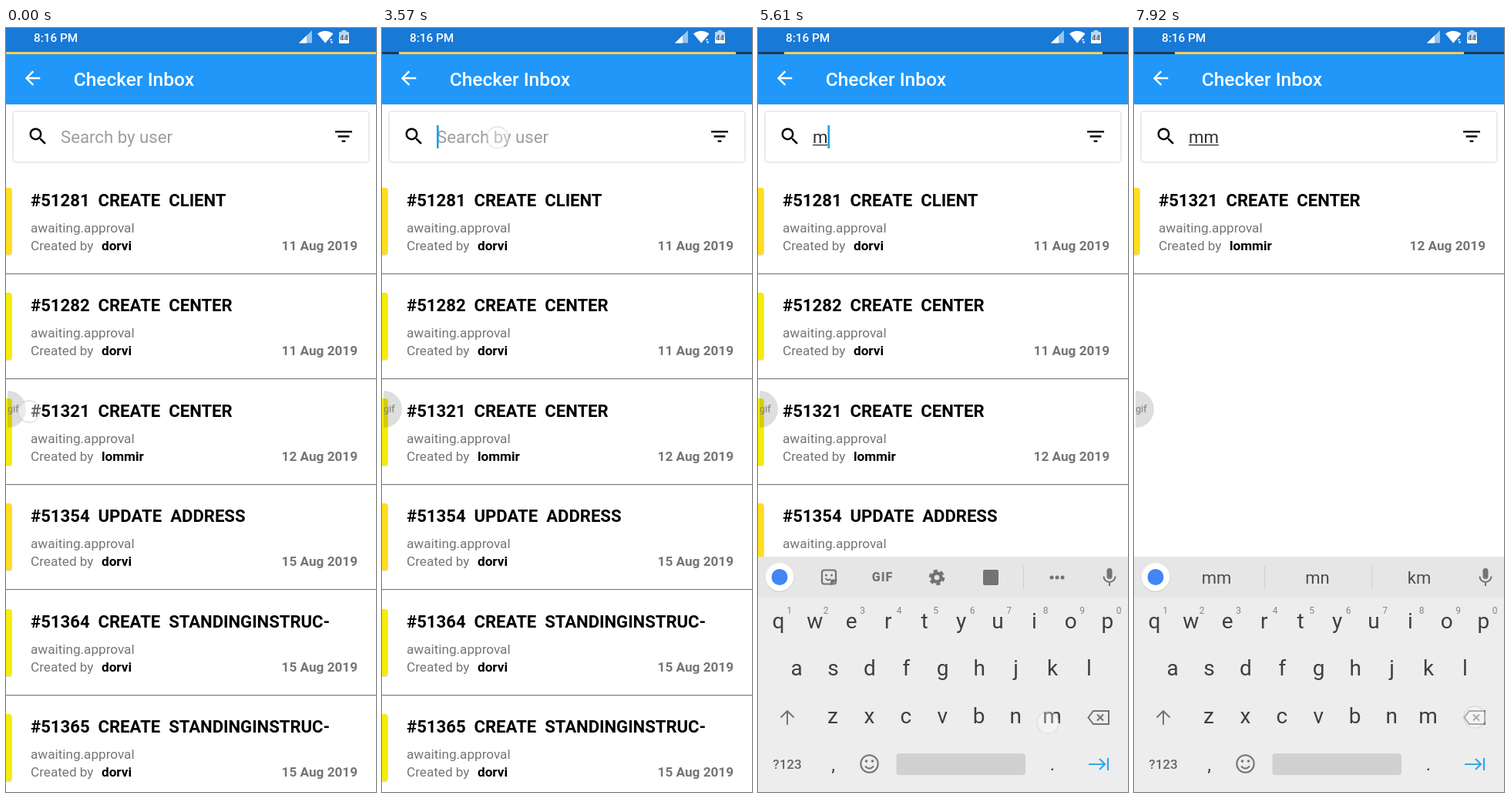
These frames come from a looping animation (480 px wide and 990 px high, 8000 ms). An HTML page:

```html
<!DOCTYPE html>
<html lang="en">
<head>
<meta charset="utf-8">
<title>Checker Inbox</title>
<style>
html, body { margin: 0; width: 100%; height: 100%; overflow: hidden; background: #fff; }
svg { display: block; width: 480px; height: 990px; font-family: Roboto, sans-serif; }
text { white-space: pre; }
</style>
</head>
<body>
<svg id="stage" viewBox="0 0 480 990"></svg>
<script>
const LOOP = 8000;
const GREY = '#757575';
const GOLD = '#ffdd1e', LEMON = '#f6ec08';

const rows = [
  ['#51281', 'CREATE  CLIENT', 'dorvi', '11 Aug 2019'],
  ['#51282', 'CREATE  CENTER', 'dorvi', '11 Aug 2019'],
  ['#51321', 'CREATE  CENTER', 'lommir', '12 Aug 2019'],
  ['#51354', 'UPDATE  ADDRESS', 'dorvi', '15 Aug 2019'],
  ['#51364', 'CREATE  STANDINGINSTRUC-', 'dorvi', '15 Aug 2019'],
  ['#51365', 'CREATE  STANDINGINSTRUC-', 'dorvi', '15 Aug 2019']
];
const MATCH = 2;
const rowY = i => Math.round(i * 136.4);

// time, left edge of the timer bar
const barSteps = [[0, 0], [420, 5], [720, 7], [1020, 10], [1290, 12], [2580, 17], [2870, 19],
  [3170, 22], [4230, 26], [4530, 29], [4830, 31], [5060, 34], [6040, 38], [6340, 41],
  [6690, 43], [6990, 46], [7290, 48], [7580, 50], [7830, 53]];

// x, y, down, release, gone
const touches = [
  [30, 497, -1, 90, 420],
  [126, 117, 1380, 2080, 2250],
  [150, 142, 3340, 3560, 3700],
  [376, 900, 5400, 5570, 5700],
  [377, 895, 6150, 6380, 6560],
  [442, 893, 7830, 8000, 8001]
];

// cursor is visible inside these spans
const cursorOn = [[3560, 4060], [4560, 5060], [5570, 6070], [6340, 6840], [7330, 7830]];

const text = (x, y, size, fill, str, extra = '') =>
  `<text x="${x}" y="${y}" font-size="${size}" fill="${fill}" ${extra}>${str}</text>`;
const rect = (x, y, w, h, fill, extra = '') =>
  `<rect x="${x}" y="${y}" width="${w}" height="${h}" fill="${fill}" ${extra}/>`;
const circle = (x, y, r, fill, extra = '') =>
  `<circle cx="${x}" cy="${y}" r="${r}" fill="${fill}" ${extra}/>`;
const path = (d, fill, extra = '') => `<path d="${d}" fill="${fill}" ${extra}/>`;
const line = (d, stroke, w) => path(d, 'none', `stroke="${stroke}" stroke-width="${w}"`);
// 24-unit icon centred on x, y
const icon = (x, y, d, fill) =>
  `<g transform="translate(${x} ${y}) scale(1.222) translate(-12 -12)">${path(d, fill)}</g>`;
const MID = 'text-anchor="middle"', BOLD = 'font-weight="700"', MEDIUM = 'font-weight="500"';

function rowMarkup([id, action, user, date], i) {
  const fill = i === 0 || i === 3 ? GOLD : LEMON;
  return `<g class="row" transform="translate(0 ${rowY(i)})">
    ${rect(-8, 208, 15.8, 87, '#dedede', 'rx="3.500"')}
    ${rect(-8, 207, 15.6, 86.5, fill, 'rx="3.500" class="tag"')}
    ${text(32, 231, 22.1, '#000', id + '  ' + action, BOLD)}
    ${text(32, 265, 17.15, GREY, 'awaiting.approval')}
    ${text(32, 288.3, 17.15, GREY, 'Created by')}
    ${text(124, 288.3, 17.15, '#000', user, BOLD)}
    ${text(456, 288.3, 17.15, GREY, date, BOLD + ' text-anchor="end"')}
    ${rect(0, 318, 480, 1.1, '#80707f')}
  </g>`;
}

function header() {
  return rect(0, 0, 480, 31, '#1979d6') + rect(0, 34, 480, 65, '#2097f9')
    + text(36, 17.5, 15.3, '#fff', '8:16 PM', MEDIUM)
    + path('M380 19.5L397 3v16.5z', '#8fc4f3') + path('M380 19.5L390 9.8v9.7z', '#fff')
    + path('M404 7.5q10-7.5 20.500 0L414.200 19.500z', '#fff')
    + path('M419 15h5v5h-5z', '#1979d6') + path('M419.500 16l2-2 2 2zM420.500 17.500h4l-2 2.500z', '#fff')
    + path('M432 6q0-1 1-1h2.500v-2h6v2h2.500q1 0 1 1v13q0 1-1 1h-11q-1 0-1-1z', '#b9d8f5')
    + path('M432 13h13v6q0 1-1 1h-11q-1 0-1-1z', '#fff')
    + text(438.5, 15.5, 9.5, '#3f5468', '44', MID + ' ' + MEDIUM)
    + icon(34.5, 65, 'M20 11H7.830l5.590-5.590L12 4l-8 8 8 8 1.410-1.410L7.830 13H20v-2z', '#fff')
    + text(87.7, 74.5, 24.5, '#fff', 'Checker Inbox', MEDIUM)
    + rect(0, 31, 480, 3, '#1d3a55') + rect(0, 31, 480, 3, '#f5cf57', 'id="bar"');
}

function search() {
  return rect(9.5, 108.5, 461, 65, '#fff', 'rx="4" style="filter:drop-shadow(0 .5px 1.200px #0005)"')
    + icon(41.5, 140.5, 'M15.500 14h-.790l-.280-.270A6.500 6.500 0 1 0 13.730 14.430l.270.280v.790l5 4.990L20.490 19zm-6 0a4.500 4.500 0 1 1 0-9 4.500 4.500 0 0 1 0 9z', '#000')
    + icon(438, 140.5, 'M10 18h4v-2h-4zM3 6v2h18V6zM6 13h12v-2H6z', '#000')
    + text(71, 149, 22.2, '#9b9f9b', 'Search by user', 'id="hint"')
    + text(71, 149, 22.2, '#303030', '', 'id="typed"')
    + rect(71, 151, 0, 1.3, '#303030', 'id="under"')
    + rect(71, 126, 2.6, 30, '#1e9fe0', 'id="cursor"');
}

function keyboard() {
  const ink = '#3c4043', soft = '#737373';
  const keys = (str, x, y) => [...str].map((c, i) =>
    text(x + i * 47.43, y, 28, ink, c, MID)).join('');
  const hints = [...'1234567890'].map((c, i) => text(40.5 + i * 47.5, 759, 12, '#858585', c, MID)).join('');
  const tools = rect(83, 702.5, 18, 18, 'none', `rx="3" stroke="${soft}" stroke-width="2.200"`)
    + path('M94 722.500v-5q0-3 3-3h6z', soft) + circle(88.5, 709, 1.5, soft) + circle(95.5, 709, 1.5, soft)
    + line('M87.500 713q3 4 7 1', soft, 2)
    + text(161.5, 717, 16, soft, 'GIF', MID + ' font-weight="900" letter-spacing="1"')
    + circle(232, 712, 5.6, 'none', `stroke="${soft}" stroke-width="4.500"`)
    + circle(232, 712, 8.6, 'none', `stroke="${soft}" stroke-width="3.400" stroke-dasharray="5 4.006"`)
    + rect(292, 702, 20, 20, soft, 'rx="2"')
    + rect(344, 697, 1, 30, '#d0d0d0')
    + [381, 388, 395].map(x => circle(x, 712, 2.5, soft)).join('');
  const words = [['mm', 107], ['mn', 238], ['km', 370]].map(([w, x]) =>
    text(x, 720, 22, '#4a4d50', w, MID)).join('')
    + rect(169, 697, 1, 30, '#d0d0d0') + rect(308, 697, 1, 30, '#d0d0d0');
  return `<g id="kb">${rect(0, 685, 480, 325, '#ededee')}${rect(0, 685, 480, 53, '#e6e6e6')}
    ${circle(28, 712.5, 18.5, '#cfcfcf')}${circle(28, 711.5, 18.2, '#fff')}${circle(28, 711.5, 10.5, '#4285f4')}
    <g id="tools">${tools}</g><g id="words">${words}</g>
    ${rect(452.5, 700, 7, 14, soft, 'rx="3.500"')}
    ${line('M448.500 710.500a7.500 7.500 0 0 0 15 0M456 718v5', soft, 2)}
    ${keys('qwertyuiop', 26.4, 778)}${hints}
    ${keys('asdfghjkl', 50, 839)}${keys('zxcvbnm', 97, 901)}
    ${line('M38 903v-18M29.500 893.500l8.500-8.500 8.500 8.500', soft, 2)}
    ${line('M435 885h20v17h-20l-6.500-8.500z', soft, 2)}${line('M440 889.500l8 8M448 889.500l-8 8', soft, 2)}
    ${text(38, 960, 17, '#666', '?123', MID + ' ' + MEDIUM)}
    ${text(97.5, 963, 24, ink, ',', MID)}${text(382, 961.5, 24, ink, '.', MID)}
    ${circle(144.5, 953.5, 11.2, 'none', `stroke="${soft}" stroke-width="2"`)}
    ${circle(140.5, 950, 1.8, soft)}${circle(148.5, 950, 1.8, soft)}
    ${line('M139 956.500q5.500 6 11 0', soft, 2)}
    ${rect(179.5, 940, 167.5, 28, '#d0d0d0', 'rx="4"')}
    ${line('M429 954h20M443 947l7 7-7 7M454 946v16', '#35a7e6', 2.2)}
  </g>`;
}

const stage = document.getElementById('stage');
stage.innerHTML = `<clipPath id="view"><rect id="viewBox" y="180" width="480" height="810"/></clipPath>
  <clipPath id="edge"><rect x="2" y="460" width="40" height="70"/></clipPath>
  ${rect(0, 0, 480, 990, '#fff')}
  <g clip-path="url(#view)">${rows.map(rowMarkup).join('')}</g>
  ${header()}${search()}${keyboard()}
  <g clip-path="url(#edge)">${circle(2, 494, 24, '#000', 'fill-opacity=".13"')}
  ${text(2, 497.5, 12.5, '#8c8c8c', 'gif', MEDIUM)}</g>
  ${circle(0, 0, 14, '#fff', 'id="touch" fill-opacity=".4" stroke="#c3c3d6" stroke-opacity=".55" stroke-width="1.300"')}`;

const el = id => document.getElementById(id);
const [bar, hint, typed, under, cursor, kb, tools, words, view, touch] =
  ['bar', 'hint', 'typed', 'under', 'cursor', 'kb', 'tools', 'words', 'viewBox', 'touch'].map(el);
const rowEls = [...document.querySelectorAll('.row')];
const matchTag = rowEls[MATCH].querySelector('.tag');

const set = (node, attrs) => { for (const k in attrs) node.setAttribute(k, attrs[k]); };
const show = (node, on) => node.setAttribute('visibility', on ? 'visible' : 'hidden');
const part = (t, from, span) => Math.min(1, Math.max(0, (t - from) / span));

function draw(t) {
  const left = barSteps.filter(s => s[0] <= t).pop()[1];
  set(bar, { x: left, width: 480 - 2 * left + (left ? 1 : 0) });

  const count = t < 5570 ? 0 : t < 6340 ? 1 : 2;
  const width = count * 19.45;
  typed.textContent = 'm'.repeat(count);
  show(hint, !count);
  set(under, { width });
  set(cursor, { x: 71 + width });
  show(cursor, cursorOn.some(([a, b]) => t >= a && t < b));

  const slide = (1 - part(t, 3700, 285)) ** 2;
  set(kb, { transform: `translate(0 ${Math.round(305 * slide)})` });
  show(kb, t >= 3700);
  set(view, { height: t < 3750 ? 810 : 505 });
  show(tools, t >= 3700 && count < 2);
  show(words, count === 2);

  // non-matching rows fade, then the match glides to the top
  const fade = 1 - part(t, 6425, 120);
  const move = (1 - Math.cos(Math.PI * part(t, 6545, 250))) / 2;
  rowEls.forEach((row, i) => { if (i !== MATCH) set(row, { opacity: fade }); });
  set(rowEls[MATCH], { transform: `translate(0 ${rowY(MATCH) * (1 - move)})` });
  set(matchTag, { fill: move === 1 ? GOLD : LEMON });

  const hit = touches.find(p => t >= p[2] && t < p[4]);
  show(touch, hit);
  if (hit) set(touch, { cx: hit[0], cy: hit[1], opacity: t < hit[3] ? 1 : 1 - 0.8 * part(t, hit[3], hit[4] - hit[3]) });
}

const start = performance.now();
function tick() {
  draw((performance.now() - start) % LOOP);
  requestAnimationFrame(tick);
}
draw(0);
requestAnimationFrame(tick);
</script>
</body>
</html>
```
